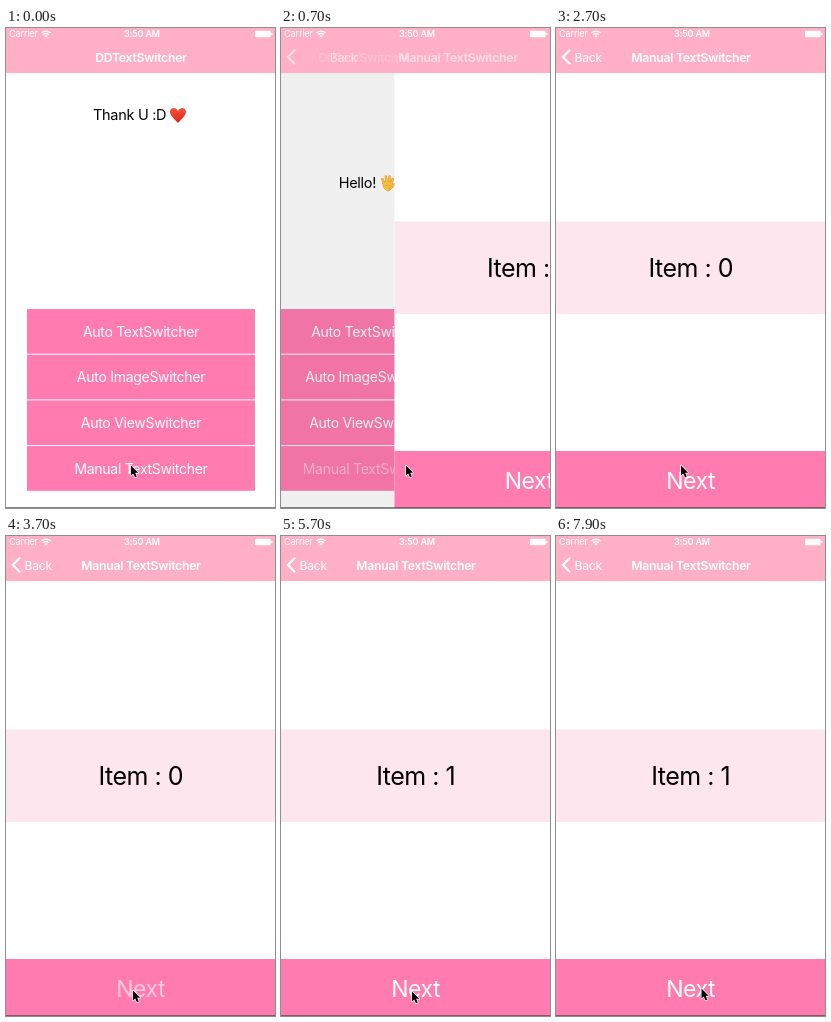
Write an HTML page with a canvas that moves like this. It is 269 by 480 pixels and loops after 8000 ms.

```html
<!DOCTYPE html>
<html lang="en">
<head>
<meta charset="utf-8">
<title>DDTextSwitcher</title>
<style>
  html, body { margin: 0; width: 100%; height: 100%; overflow: hidden; background: #fff; }
  canvas { display: block; width: 269px; height: 480px; }
</style>
</head>
<body>
<canvas id="stage"></canvas>
<script>
const W = 269, H = 480, LOOP = 8000, STEP = 100, NAV_H = 45;
const BAR = '#ffb0c6', BUTTON = '#ff7bb0', STRIP = '#fee6ee';

const canvas = document.getElementById('stage');
const ctx = canvas.getContext('2d');
const dpr = window.devicePixelRatio || 1;
canvas.width = W * dpr;
canvas.height = H * dpr;

const clamp = v => Math.max(0, Math.min(1, v));
const mix = (a, b, p) => a + (b - a) * p;
const ramp = (t, from, to) => clamp((t - from) / (to - from));
const easeOut = p => 1 - (1 - p) ** 3;

// cubic-bezier(.42, 0, .58, 1), solved by bisection
function easeInOut(x) {
  let lo = 0, hi = 1;
  for (let i = 0; i < 20; i++) {
    const s = (lo + hi) / 2, r = 1 - s;
    if (3 * r * r * s * .42 + 3 * r * s * s * .58 + s ** 3 < x) lo = s; else hi = s;
  }
  return lo * lo * (3 - 2 * lo);
}

// Piecewise linear track of [time, ...values]
function track(keys, t) {
  const i = keys.findIndex(k => k[0] > t);
  if (i === 0) return keys[0].slice(1);
  if (i < 0) return keys[keys.length - 1].slice(1);
  const a = keys[i - 1], b = keys[i], p = ramp(t, a[0], b[0]);
  return a.slice(1).map((v, n) => mix(v, b[n + 1], p));
}

const MANUAL_ALPHA = [[0, 1], [100, .7], [300, .2], [600, .2], [900, 1]];
const NEXT_ALPHA = [[3600, 1], [3700, .6], [4000, .2], [4500, .2], [4900, 1]];
const CURSOR = [[3100, 124.5, 437], [3500, 126.5, 454], [5400, 126.5, 454],
  [5700, 130.5, 455], [5900, 144, 452], [6400, 144, 452], [6900, 145, 452]];

function group(draw, x = 0, y = 0, alpha = 1) {
  ctx.save();
  ctx.translate(x, y);
  ctx.globalAlpha *= alpha;
  draw();
  ctx.restore();
}

function rect(x, y, w, h, color) {
  ctx.fillStyle = color;
  ctx.fillRect(x, y, w, h);
}

function text(str, x, y, size, { color = '#fff', align = 'center', weight = 400, alpha = 1 } = {}) {
  group(() => {
    ctx.font = `${weight} ${size}px Inter, "Open Sans", sans-serif`;
    ctx.letterSpacing = `${-.02 * size}px`;
    ctx.textAlign = align;
    ctx.fillStyle = color;
    ctx.fillText(str, x, y);
  }, 0, 0, alpha);
}

// Two items pushed upwards through a clipped box
function switcher(top, height, p, first, second) {
  group(() => {
    ctx.beginPath();
    ctx.rect(0, top, W, height);
    ctx.clip();
    group(first, 0, -height * p);
    group(second, 0, height * (1 - p));
  });
}

function heart(x, y) {
  group(() => {
    const shade = ctx.createLinearGradient(0, -7, 0, 8);
    shade.addColorStop(0, '#f8503c');
    shade.addColorStop(1, '#dc2418');
    ctx.fillStyle = shade;
    ctx.fill(new Path2D('M0 7.5C-3 5-8-.5-8-3.2C-8-8-2-8.5 0-4.2C2-8.5 8-8 8-3.2C8-.5 3 5 0 7.5Z'));
  }, x, y);
}

function hand(x, y) {
  const shape = new Path2D('M-3.6 1L-5.4-3.6M-1.2 0L-2-6.3M1.4 0L1.8-6.2M3.5 1L4.8-3.8M3.6 4.6L6.6 1.2');
  const palm = new Path2D('M-4.6 0Q0-2 4.4 0L4.6 3Q3.6 8-.3 8Q-4 7-4.6 3Z');
  group(() => {
    ctx.lineCap = 'round';
    ctx.lineJoin = 'round';
    for (const [color, grow] of [['#e89a2c', .8], ['#ffcb45', 0]]) {
      ctx.strokeStyle = ctx.fillStyle = color;
      ctx.lineWidth = 1.7 + grow;
      ctx.stroke(shape);
      ctx.fill(palm);
      ctx.lineWidth = grow || .01;
      ctx.stroke(palm);
    }
    ctx.strokeStyle = '#e5a036';
    ctx.lineWidth = .6;
    ctx.stroke(new Path2D('M-3 3Q0 1.5 3 3M1 7Q1 4.5 3.4 3.5'));
  }, x, y);
}

function menuPage(t) {
  rect(0, 0, W, H, '#fff');
  const black = { color: '#000', align: 'left' };
  switcher(NAV_H, 220, easeInOut(ramp(t, -385, 615)),
    () => { text('Thank U :D', 87, 160, 14.5, black); heart(172, 155); },
    () => { text('Hello!', 104.3, 160, 14.5, black); hand(153.5, 154.8); });
  ['Auto TextSwitcher', 'Auto ImageSwitcher', 'Auto ViewSwitcher', 'Manual TextSwitcher'].forEach((label, i) => {
    const y = 281 + 45.7 * i;
    rect(21, y, 228, 44.7, BUTTON);
    text(label, 135, y + 27.5, 14, { alpha: i === 3 ? track(MANUAL_ALPHA, t)[0] : 1 });
  });
}

function manualPage(t) {
  rect(0, 0, W, H, '#fff');
  rect(0, 193.5, W, 92.5, STRIP);
  const item = n => () => text('Item : ' + n, 134.7, 249, 25, { color: '#000' });
  switcher(193.5, 92.5, easeInOut(ramp(t, 4580, 5580)), item(0), item(1));
  rect(0, 423, W, 57, BUTTON);
  text('Next', 134.7, 460.5, 23, { alpha: track(NEXT_ALPHA, t)[0] });
}

function statusBar() {
  text('Carrier', 3, 9.3, 9.2, { align: 'left' });
  text('3:50 AM', 136, 9.3, 9, { weight: 600 });
  ctx.strokeStyle = ctx.fillStyle = '#fff';
  ctx.lineWidth = 1.3;
  for (const r of [6.4, 4]) {
    ctx.beginPath();
    ctx.arc(40, 9.5, r, -Math.PI * .75, -Math.PI * .25);
    ctx.stroke();
  }
  ctx.beginPath();
  ctx.moveTo(40, 9.8);
  ctx.arc(40, 9.8, 2.4, -Math.PI * .75, -Math.PI * .25);
  ctx.fill();
  ctx.beginPath();
  ctx.roundRect(249, 2.7, 15.7, 6.6, 1.2);
  ctx.roundRect(265.3, 4.8, 1.2, 2.4, .5);
  ctx.fill();
}

function navBar(p) {
  rect(0, 0, W, NAV_H, BAR);
  statusBar();
  text('DDTextSwitcher', mix(135, 45, p), 33.5, 12.2, { weight: 600, alpha: clamp(1 - p * 1.4) });
  text('Manual TextSwitcher', mix(235, 135, p), 33.5, 12.2, { weight: 600, alpha: p });
  text('Back', mix(90, 18.5, p), 33.5, 12.2, { align: 'left', alpha: p });
  group(() => {
    ctx.strokeStyle = '#fff';
    ctx.lineWidth = 2.2;
    ctx.stroke(new Path2D('M14 21.7L6.9 29L14 36.3'));
  }, 0, 0, p);
}

function cursor(x, y) {
  group(() => {
    const arrow = new Path2D('M.5.5V10.6L2.8 8.5L4.5 12.4L6.3 11.6L4.6 7.8H7.7Z');
    ctx.lineJoin = 'round';
    ctx.strokeStyle = '#fff';
    ctx.lineWidth = 1.3;
    ctx.stroke(arrow);
    ctx.fillStyle = '#000';
    ctx.fill(arrow);
  }, x, y);
}

function draw(t) {
  const push = easeOut(ramp(t, 600, 1000));
  ctx.setTransform(dpr, 0, 0, dpr, 0, 0);
  rect(0, 0, W, H, '#fff');
  if (push < 1) {
    group(() => menuPage(t), -W * .3 * push);
    rect(0, 0, W, H, `rgba(0,0,0,${.1 * push})`);
  }
  if (push > 0) group(() => manualPage(t), W * (1 - push));
  navBar(push);
  rect(0, 479, W, 1, 'rgba(60,60,60,.6)');
  cursor(...track(CURSOR, t));
}

const start = performance.now();
function tick() {
  const t = (performance.now() - start) % LOOP;
  draw(Math.floor(t / STEP) * STEP);
  requestAnimationFrame(tick);
}
tick();
</script>
</body>
</html>
```
